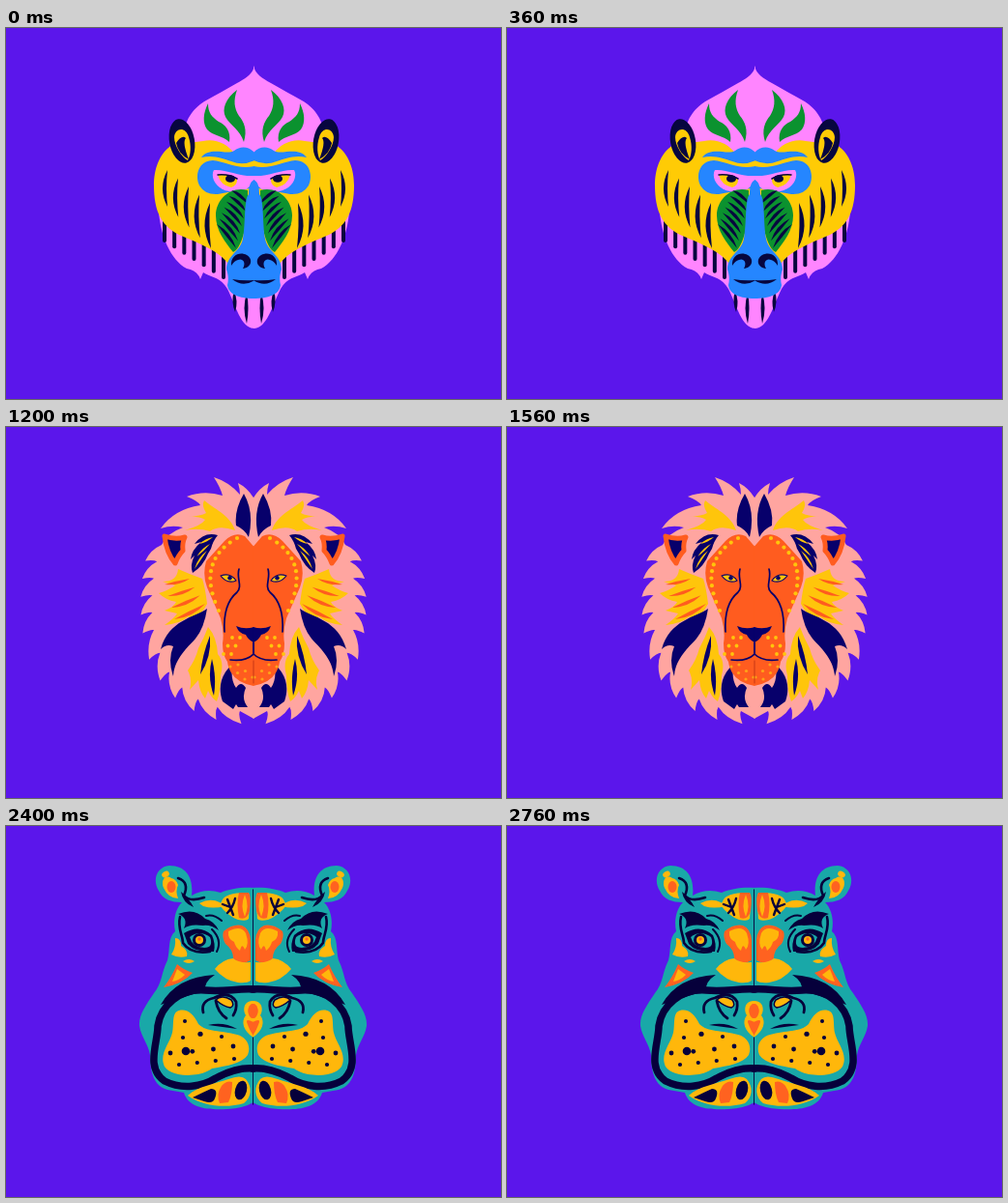
Recreate the animation shown at these times as an HTML page. Size 512 px wide and 384 px high, loop 3 s.

```html
<!DOCTYPE html>
<html lang="en">
<head>
<meta charset="utf-8">
<title>Animal faces</title>
<style>
html, body { margin: 0; width: 100%; height: 100%; overflow: hidden; background: #5b16eb; }
svg { display: block; width: 100vw; height: 100vh; }
</style>
</head>
<body>
<svg id="stage" viewBox="0 0 512 384"></svg>
<script>
const HOLD = 600;
const many = (n, draw) => Array.from({ length: n }, (_, i) => draw(i)).join('');
const mix = (a, b, t) => a + (b - a) * t;

const fill = (c, d) => `<path fill="${c}" d="${d}Z"/>`;
const line = (c, w, d) => `<path fill="none" stroke="${c}" stroke-width="${w}" stroke-linecap="round" stroke-linejoin="round" d="${d}"/>`;
const panel = (c, edge, w, d) => `<path fill="${c}" stroke="${edge}" stroke-width="${w}" stroke-linejoin="round" d="${d}Z"/>`;
const dot = (c, x, y, rx, ry = rx, a = 0) =>
  `<ellipse fill="${c}" rx="${rx}" ry="${ry}" transform="translate(${x} ${y}) rotate(${a})"/>`;

// Draws n shapes whose arguments run evenly from first to last
const blend = (n, first, last, draw) =>
  many(n, i => draw(...first.map((v, k) => mix(v, last[k], n > 1 ? i / (n - 1) : 0)), i));

// Point on a quadratic curve, pushed out by d along its normal
function on(a, b, c, t, d = 0) {
  const [x, y] = a.map((v, k) => mix(mix(v, b[k], t), mix(b[k], c[k], t), t));
  const [dx, dy] = a.map((v, k) => mix(b[k] - v, c[k] - b[k], t));
  const len = Math.hypot(dx, dy);
  return [x - dy / len * d, y + dx / len * d];
}

const trail = (col, n, a, b, c, r, r2 = r) =>
  many(n, i => dot(col, ...on(a, b, c, i / (n - 1)), i % 2 ? r2 : r));

// Swept tufts along a curve, as path segments
const fringe = (n, a, b, c, depth, lean = .9) => many(n, i => {
  const p = (u, d) => on(a, b, c, (i + u) / n, d * depth).join(' ');
  return `Q${p(lean * .4, .8)} ${p(lean, 1)}Q${p(lean * .85, .3)} ${p(1, 0)}`;
});

// Pointed stripe of width w, bowed sideways by b
function leaf(c, x1, y1, x2, y2, w, b = 0) {
  const ends = [[x1, y1], [(x1 + x2) / 2, (y1 + y2) / 2], [x2, y2]];
  const ctrl = k => on(...ends, .5, k).join(' ');
  return fill(c, `M${x1} ${y1}Q${ctrl(b + w)} ${x2} ${y2}Q${ctrl(b - w)} ${x1} ${y1}`);
}
const leaves = (c, n, first, last) => blend(n, first, last, (...p) => leaf(c, ...p.slice(0, 6)));

// Every part is drawn with its reflection
const face = (cx, parts) =>
  parts.map(p => `${p}<g transform="matrix(-1 0 0 1 ${2 * cx} 0)">${p}</g>`).join('');

function mandrill() {
  const pink = '#ff85ff', gold = '#ffcb05', blue = '#2586ff', green = '#0b922f', navy = '#07063f';
  return face(256.5, [
    fill(pink, 'M257 39C255 48 248 52 239 57C227 64 216 70 207 75C195 82 186 92 183 112L158 190C160 215 170 240 187 249Q198 251 201 260L204 253C212 258 222 258 229 270C238 288 243 311 257 311'),
    blend(7, [164, 186, 220], [225, 226, 258], (x, top, end) => line(navy, 4, `M${x} ${top}V${end}`)),
    leaves(navy, 2, [236, 272, 237, 294, 4], [249, 274, 249, 306, 4]),
    fill(gold, 'M257 134L236 130C230 120 216 114 204 117L172 121C158 130 153 147 153 163C153 190 161 205 179 214C201 223 221 232 229 243L257 244'),
    leaves(navy, 5, [167, 147, 167, 185, 4, 6], [211, 181, 212, 228, 5, 7]),
    dot(navy, 182, 117, 13, 23, -10),
    fill(gold, 'M174 113C175 103 186 102 189 113C192 122 191 132 188 137C182 134 174 122 174 113'),
    fill(navy, 'M176 119Q182 110 186 114Q182 118 189 136Q178 130 176 119'),
    fill(green, 'M239 64C227 73 223 84 227 92C232 101 242 105 246 118C250 105 246 97 241 91C236 83 235 75 239 64'),
    fill(green, 'M209 78C204 88 203 98 208 105C214 112 224 111 231 118C233 107 227 100 220 97C213 92 209 88 209 78'),
    fill(blue, 'M257 129C251 122 242 122 236 127C228 132 211 122 202 134C214 131 224 135 233 138Q245 143 257 137'),
    fill(blue, 'M257 143C240 147 226 138 214 137C199 137 195 153 200 163Q206 173 219 172L257 165'),
    fill(pink, 'M257 153C241 154 228 146 215 147C211 154 217 167 231 169Q244 172 252 164L257 164'),
    fill(gold, 'M219 152Q231 150 239 157Q239 163 233 165Q222 163 219 152'),
    line(navy, 1.5, 'M219 152Q231 151 239 156'),
    dot(navy, 232, 156, 5, 3.8),
    fill(green, 'M250 168C233 163 217 177 217 194C217 210 227 222 235 232C243 228 247 210 250 195'),
    leaves(navy, 7, [233, 168, 250, 182, 3.5, -3], [218, 203, 238, 228, 3.5, -3]),
    fill(blue, 'M257 157C252 159 251 165 251 172C246 177 248 202 245 218C243 231 228 235 228 250Q231 258 229 266C230 276 242 280 257 280'),
    fill(navy, 'M233 246C232 235 242 231 249 235C256 239 254 248 245 249C249 242 244 238 240 240Q236 241 233 246'),
    leaf(navy, 234, 260, 257, 261, 3.5, 5)
  ]);
}

function monkey() {
  const orange = '#ff5f1f', navy = '#09006b', teal = '#11cdbd', gold = '#ffb70f';
  const seeds = [38, 50, 62].map((r, k) => blend(4 + k, [98], [138 + 6 * k], deg => {
    const a = deg * Math.PI / 180;
    return dot(gold, 255 + r * 1.18 * Math.cos(a), 165 - r * Math.sin(a), 4.7, 2.1, 180 - deg);
  })).join('');
  const rays = blend(7, [.1], [Math.PI / 2], a => {
    const end = (rx, ry) => `${255.5 - rx * Math.cos(a)} ${250 + ry * Math.sin(a)}`;
    return line(teal, 2.4, `M${end(38, 43)}L${end(54, 66)}`);
  });
  return face(255.5, [
    fill(navy, 'M182 153C172 145 152 148 144 164C136 180 139 195 147 207C152 218 163 227 182 219'),
    panel(orange, gold, 2, 'M161 160C151 162 145 179 148 193Q151 207 159 212C164 213 170 208 171 202Q165 191 166 178C166 168 166 160 161 160'),
    line(gold, 2, 'M152 196Q162 184 166 194Q164 204 169 208'),
    dot(teal, 157, 182, 2.5, 4, -10),
    fill(orange, 'M256 88C228 89 201 100 187 122C176 138 173 160 174 177C174 203 177 224 187 238C200 247 198 257 201 270C206 291 231 310 256 322'),
    seeds,
    fill(navy, 'M256 138C251 142 248 149 243 153C238 154 235 147 228 145C215 141 198 150 192 164C187 176 186 194 191 204C199 214 216 207 219 222C222 238 216 252 222 264C230 271 223 274 226 280Q231 286 240 282Q244 292 256 293'),
    trail(teal, 7, [226, 152], [191, 156], [201, 202], 2, 3),
    trail(teal, 3, [251, 152], [244, 160], [233, 156], 1.8, 2.5),
    trail(teal, 2, [184, 160], [183, 166], [183, 172], 2.5, 1.6),
    panel(orange, teal, 2, 'M207 182C210 166 241 166 242.5 182C240 198 210 198 207 182'),
    fill(navy, 'M209 180Q225 167 241 179Q233 178 234 182C231 189 219 189 216 180Q212 178 209 180'),
    dot(gold, 224, 178, 4.5, 2.5),
    fill(orange, 'M210 195Q226 203 241 196Q237 210 226 209Q216 207 210 195'),
    fill(teal, 'M246 207Q249 201 256 201V206Q250 205 246 207'),
    fill(teal, 'M250 217Q252 213 256 213V216Q252 216 250 217'),
    dot(teal, 255.5, 223, 3, 1.8),
    fill(gold, 'M195 218Q204 216 213 219Q216 224 214 229Q205 231 198 230Q193 225 195 218'),
    fill(gold, 'M200 236Q207 231 215 232Q217 237 214 241Q208 243 202 243Q199 240 200 236'),
    fill(orange, 'M228 248C225 232 231 225 241 227Q250 230 252 239C248 230 235 227 232 235Q230 241 228 248'),
    dot(gold, 240.5, 241, 7, 4, 30),
    fill(orange, 'M234 247Q241 251 250 248Q247 255 241 253Q236 252 234 247'),
    line(orange, 2.6, 'M232 270Q244 268 256 269.5'),
    leaf(teal, 246, 277, 265, 277, 3),
    rays
  ]);
}

function lion() {
  const pink = '#ffa5a0', gold = '#ffc50b', orange = '#ff5c1f', navy = '#07006b';
  return face(256, [
    fill(pink, 'M256.5 74Q250 63 240 58Q242 64 242 70Q231 57 215 52Q222 63 224 71Q205 65 187 72Q198 76 201 81Q174 85 160 105Q172 101 183 104Q166 110 161 122'
      + fringe(5, [161, 122], [147, 165], [153, 210], 12, 1.1)
      + fringe(6, [153, 210], [167, 287], [242, 294], 13, 1.1) + 'L256.5 302'),
    fill(navy, 'M246 69Q236 86 238 102Q247 106 251 114Q257 88 246 69'),
    fill(gold, 'M237 107Q220 101 211 108Q199 104 185 107Q202 102 206 96Q199 92 188 93Q202 92 207 89Q202 81 205 76C219 87 232 92 237 107'),
    panel(navy, orange, 5, 'M164 113Q175 117 185 114Q182 120 183 128Q178 133 175 141Q166 131 164 113'),
    fill(navy, 'M219 112Q205 108 195 121L202 119Q192 127 191 137L195 133Q190 143 193 151Q204 144 209 131L212 126Q214 118 219 112'),
    leaves(gold, 3, [214, 114, 200, 121, 2], [208, 128, 195, 147, 2]),
    fill(gold, 'M178 147Q189 152 203 157Q206 166 208 183Q202 195 187 207Q191 199 189 196Q179 204 164 205Q174 198 177 193L164 190Q174 186 176 181Q165 179 158 172Q168 169 175 164L162 160Q177 160 178 147'),
    leaves(orange, 4, [164, 163, 190, 157, 3, 2], [174, 199, 206, 183, 4, 3]),
    fill(navy, 'M208 188C195 197 168 200 160 230Q166 224 173 227Q167 241 173 258C174 240 188 228 196 219Q205 208 208 188'),
    fill(gold, 'M209 207Q218 217 219 235Q226 243 222 257Q222 274 218 284Q213 281 209 273L206 281Q200 274 199 262L190 272Q193 261 188 252Q196 241 199 229Q205 218 209 207'),
    leaves(navy, 2, [211, 216, 201, 256, 5, -2], [213, 240, 215, 278, 5, 1]),
    fill(navy, 'M234 246C222 256 219 270 224 284L235 292L238 287L240 290H250Q243 281 248 270Q243 262 238 270Q232 262 234 246'),
    fill(orange, 'M256.5 124L247 113Q236 108 226 118L207 139Q203 153 208 166L222 198Q226 212 224 224Q224 236 229 243Q232 264 256.5 268'),
    trail(gold, 12, [239, 115], [196, 139], [220, 190], 2.1),
    blend(3, [242, 218], [233, 235], (x, y) => trail(gold, 2, [x, y], [x - 4, y], [x - 8, y], 1.9)),
    blend(3, [232, 248], [247, 261], (x, y) => trail('#ffa318', 2, [x, y], [x + 4, y - 1], [x + 8, y - 2], 1.6)),
    panel(gold, navy, 1.2, 'M222 154Q232 150 238 159Q229 163 222 154'),
    dot(navy, 231.5, 156.3, 2.2),
    line(navy, 1.7, 'M241 147C238 156 245 165 239 171C227 181 225 196 226 212'),
    fill(navy, 'M238 206Q247 210 256.5 207V223Q250 220 248 215Q241 214 238 206'),
    line(navy, 1.7, 'M256 222V235Q248 243 232 241'),
    line('#c83c18', .6, 'M256 242V265')
  ]);
}

function orangutan() {
  const orange = '#ff5f1f', navy = '#07006b', teal = '#0bd2c5', tan = '#ffb64f', pink = '#ff80ff';
  const spot = (x, y, a) => dot(navy, x, y, 3.6, 4.4, a) + dot(tan, x, y, 1.6, 2.2, a);
  return face(256.5, [
    fill(navy, 'M257 105L205 108C166 130 132 166 132 215C133 258 160 297 194 297H257'),
    panel(orange, tan, 4, 'M151 174C158 166 168 166 173 170C176 178 178 189 174 195Q168 199 165 197C160 196 149 198 148 192Q147 181 151 174'),
    panel(teal, tan, 4, 'M142 207C155 203 174 206 188 211Q191 214 189 219L184 225C174 230 154 223 145 219Q140 215 142 207'),
    panel(orange, tan, 4, 'M143 233C155 232 169 236 177 241Q181 245 178 249C169 254 154 249 147 245Q142 239 143 233'),
    panel(teal, tan, 4, 'M149 256C160 255 171 257 177 260Q181 263 180 271L183 282Q182 286 174 286C162 283 151 268 149 256'),
    blend(4, [166, 151, 173, 155], [201, 121, 207, 138], (a, b, c, d, i) => line(i % 2 ? teal : tan, 6.5, `M${a} ${b}L${c} ${d}`)),
    fill(orange, 'M257 148Q248 138 235 138Q222 136 211 143C193 146 178 166 177 184C177 201 189 206 202 206Q214 209 207 216C195 223 189 244 191 260C193 280 198 299 212 307H257'),
    fill(orange, 'M257 66' + fringe(9, [257, 67], [196, 66], [186, 112], 6, .8) + 'L177 112'
      + fringe(7, [186, 114], [220, 101], [257, 107], 17, .6)),
    fill(orange, 'M248 118Q248 134 257 147V105'),
    fill(navy, 'M205 185Q218 175 218 163Q230 158 240 170Q246 178 257 177V193Q245 190 238 195Q226 198 215 187Q210 184 205 185'),
    panel(orange, navy, 1.4, 'M217 168Q229 156 240 172Q237 178 227 178Q218 176 217 168'),
    panel(orange, navy, 1.4, 'M224 170A5 5 0 0 1 234 170A5 5 0 0 1 224 170'),
    dot(navy, 229.5, 170, 2.4),
    line(orange, 1, 'M222 190Q231 196 241 190'),
    fill(teal, 'M246 149C239 158 244 172 257 173V164C249 164 246 157 246 149'),
    spot(198, 161, 30),
    spot(193, 191, -25),
    panel(teal, navy, .8, 'M191.5 177A3.5 3.5 0 0 1 198.5 177A3.5 3.5 0 0 1 191.5 177'),
    dot(tan, 195, 177, 1.2),
    fill(tan, 'M233 215Q241 218 250 228L248 235L244 230L240 235L239 228L233 230L236 224L231 222'),
    fill(navy, 'M235 204Q242 207 245 213C246 202 252 203 257 208V222Q255 228 251 227Q245 225 244 216Q239 207 229 209'),
    leaf(orange, 254, 207, 255, 226, 2.5),
    fill(pink, 'M221 212' + fringe(6, [221, 212], [180, 250], [208, 285], 5) + fringe(4, [208, 285], [220, 309], [257, 318], 5, .8)
      + 'V290' + fringe(8, [257, 290], [212, 290], [214, 228], 5)),
    line(navy, 1.3, 'M218 262Q226 265 231 271Q240 279 257 280M219 264L223 260'),
    line(navy, 1.1, 'M225 265Q241 276 257 273'),
    fill(navy, 'M241 260Q248 263 257 261V272Q244 272 241 260')
  ]);
}

function hippo() {
  const teal = '#19a8a8', navy = '#06003b', gold = '#ffb70b', orange = '#ff6220';
  return face(255.5, [
    fill(teal, 'M256 64C244 63 231 65 222 69Q206 64 192 72C194 56 188 41 169 41C156 42 151 56 158 67C162 76 171 79 182 79C174 87 173 100 175 109C167 116 170 128 167 139C160 153 162 162 153 173C145 185 137 196 138 207C140 219 147 225 149 237C149 253 152 269 167 273L184 276C189 293 211 294 229 293Q246 292 256 286'),
    fill(gold, 'M171 54C164 49 160 57 163 64Q168 75 178 75Q175 67 178 61Q176 55 171 54'),
    dot(gold, 165, 50, 4, 3, -30),
    dot(orange, 171, 63, 4.5, 6),
    line(navy, 2.6, 'M178 54Q190 58 184 72Q190 79 205 74'),
    leaf(navy, 181, 68, 194, 84, 4, 2),
    fill(gold, 'M200 80Q211 74 221 79L226 83Q214 86 204 83'),
    fill(gold, 'M223 78Q226 69 249 69Q253 70 252 81L251 96Q249 99 240 97Q229 93 221 82'),
    fill(orange, 'M241 69H251Q254 72 252 88Q249 98 241 95Q238 80 241 69'),
    leaf(gold, 247, 71, 247, 94, 5),
    line(navy, 2.4, 'M229 76L235 92M237 75Q235 84 229 90M224 81L232 84'),
    fill(orange, 'M225 109Q235 101 244 103Q252 106 253 118V139Q243 145 235 137Q235 128 227 122Q223 115 225 109'),
    fill(gold, 'M230 109Q243 102 248 111Q252 123 247 128Q244 120 242 129Q237 125 236 120Q229 117 230 109'),
    fill(gold, 'M216 148Q224 138 235 137Q240 142 253 141V160Q249 163 240 162Q226 160 216 148'),
    fill(navy, 'M178 91Q195 84 206 96Q215 98 220 108Q212 102 204 103Q190 101 184 106Q189 95 178 91'),
    line(navy, 2.6, 'M180 94C177 106 183 113 183 121Q191 133 211 130'),
    line(navy, 2, 'M207 93Q215 91 223 98M213 107Q224 118 218 130'),
    fill(navy, 'M184 111Q200 101 213 113Q217 122 215 130Q195 131 188 122Q186 116 184 111'),
    fill(teal, 'M190 115Q200 107 211 115Q215 126 205 126Q193 126 190 115'),
    dot(navy, 200, 118, 7),
    dot(gold, 200, 118, 4),
    dot(orange, 200, 117, 1.7),
    fill(gold, 'M175 116Q181 116 181 124Q189 129 187 135Q178 137 171 133Q176 126 175 116'),
    leaf(gold, 183, 140, 195, 140, 4),
    fill(orange, 'M177 143Q184 149 193 152Q182 164 163 167Q171 157 177 143'),
    fill(gold, 'M177 148L185 154Q179 160 172 161'),
    line(navy, 7.5, 'M256 169C238 168 226 172 206 170C180 168 160 186 157 207C157 225 144 250 164 264C182 273 203 270 217 261C232 253 244 250 256 251'),
    fill(navy, 'M160 185Q176 156 216 154Q205 161 206 170'),
    line(navy, 2.8, 'M204 193Q201 181 215 178Q231 170 238 182Q239 190 235 196M217 181Q219 193 228 199'),
    panel(gold, navy, 1.5, 'M217 180Q223 174 233 180Q237 186 232 188Q225 187 217 180'),
    leaf(navy, 209, 206, 239, 210, 3, -3),
    fill(gold, 'M256 181C247 180 244 189 248 196C243 202 245 212 256 219'),
    dot(orange, 255.5, 191.5, 5, 7.5),
    fill(orange, 'M256 203Q248 199 249 203Q252 212 256 217'),
    fill(gold, 'M179 191C171 193 174 205 172 214C169 226 158 236 164 249C172 261 202 260 213 251C229 248 244 246 250 237C254 227 248 218 239 216C222 211 208 214 199 205C194 195 188 189 179 191'),
    dot(navy, 185, 202, 2),
    dot(navy, 186, 233, 4.3),
    trail(navy, 3, [183, 219], [199, 212], [223, 218], 2.1, 2.6),
    trail(navy, 4, [170, 235], [205, 233], [235, 228], 2.4),
    trail(navy, 4, [179, 247], [207, 244], [236, 241], 2.1),
    fill(gold, 'M188 279C199 269 216 267 230 262Q243 257 248 262C255 270 254 281 246 287C229 292 205 291 188 279'),
    fill(navy, 'M193 281Q203 276 212 272Q220 272 216 282Q214 288 205 285'),
    fill(orange, 'M221 287Q217 278 223 269Q228 263 234 265Q234 278 230 286'),
    dot(navy, 243, 273.5, 6, 10, 15),
    line(navy, .7, 'M255.5 66V166M255.5 219V288')
  ]);
}

const stage = document.getElementById('stage');
const faces = [mandrill, monkey, lion, orangutan, hippo];
stage.innerHTML = '<rect width="512" height="384" fill="#5b16eb"/>' + faces.map(f => `<g>${f()}</g>`).join('');
const groups = stage.querySelectorAll(':scope > g');

function render(t) {
  const now = Math.floor(t / HOLD) % groups.length;
  groups.forEach((g, i) => g.setAttribute('display', i === now ? 'inline' : 'none'));
}
function tick(t) {
  render(t);
  requestAnimationFrame(tick);
}
render(0);
requestAnimationFrame(tick);
</script>
</body>
</html>
```
